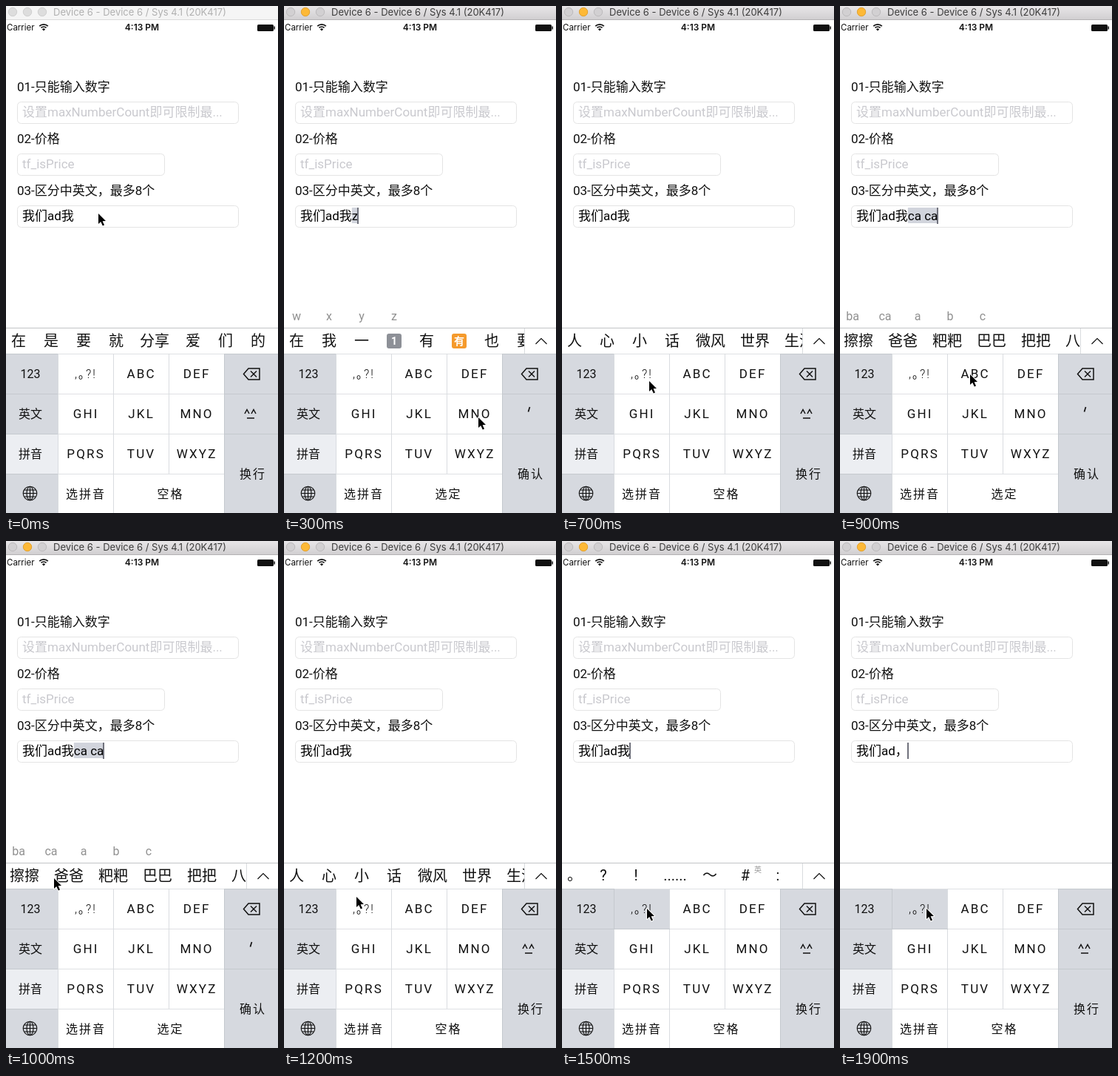
These frames come from a looping animation (368x684 px, 2000 ms). An HTML page with a canvas:

```html
<!DOCTYPE html>
<html lang="zh-CN">
<head>
<meta charset="utf-8">
<title>Text field limits</title>
<style>
  html, body { margin: 0; width: 100%; height: 100%; overflow: hidden; background: #fff; }
  canvas { display: block; width: 368px; height: 684px; }
</style>
</head>
<body>
<canvas id="stage" width="368" height="684"></canvas>
<script>
const ctx = document.getElementById('stage').getContext('2d');
const FONT = "Roboto, 'Noto Sans CJK SC', 'Noto Sans CJK', sans-serif";
const UI_FONT = 'Inter, sans-serif';
const LOOP = 2000, STEP = 100;
const KEY_GRAY = '#d6d9df', EDGE_GRAY = '#c5c9ce';

const BARS = {
  start: ['在', '是', '要', '就', '分享', '爱', '们', '的'],
  letterZ: ['在', '我', '一', '1', '有', '有', '也', '要'],
  follow: ['人', '心', '小', '话', '微风', '世界', '生活'],
  doubled: ['擦擦', '爸爸', '粑粑', '巴巴', '把把', '八八'],
  none: []
};
const EMOJI_SLOTS = { 3: '#8d9097', 5: '#f59a2c' };
const MARKS = [['。', 17], ['?', 56], ['!', 100], ['......', 153], ['～', 200], ['#', 248], [':', 292]];
const FULL = '我们ad我';

// Each state holds until the next one begins.
const STATES = [
  { at: 0, text: FULL, bar: 'start' },
  { at: 200, text: FULL, bar: 'letterZ', marked: 'z', hints: ['w', 'x', 'y', 'z'] },
  { at: 500, text: FULL, bar: 'follow' },
  { at: 900, text: FULL, bar: 'doubled', marked: 'ca ca', hints: ['ba', 'ca', 'a', 'b', 'c'] },
  { at: 1100, text: FULL, bar: 'follow' },
  { at: 1300, text: FULL, bar: 'marks', caret: true, pressed: true },
  { at: 1600, text: FULL, bar: 'marks', caret: true },
  { at: 1700, text: '我们ad', bar: 'none', caret: true },
  { at: 1800, text: '我们ad', bar: 'marks', marked: '，', pressed: true },
  { at: 1900, text: '我们ad，', bar: 'none', caret: true, pressed: true }
];

// Pointer tip at every step.
const POINTER = [
  [125, 280], [195, 445], [260, 600], [263, 555], [130, 470],
  [62, 453], [90, 480], [118, 506], [178, 497], [176, 497],
  [65, 455], [75, 455], [98, 480], [115, 496], [115, 496],
  [115, 496], [230, 493], [328, 492], [117, 496], [117, 496]
];

function rect(x, y, w, h, color) {
  ctx.fillStyle = color;
  ctx.fillRect(x, y, w, h);
}

function text(str, x, y, size, { color = '#111', align = 'left', spacing = 0, weight = 400, font = FONT } = {}) {
  ctx.font = `${weight} ${size}px ${font}`;
  ctx.letterSpacing = spacing + 'px';
  ctx.textAlign = align;
  ctx.fillStyle = color;
  ctx.fillText(str, x + (align === 'center' ? spacing / 2 : 0), y);
  return ctx.measureText(str).width;
}

function line(points, width = 1, color = '#111', close = false) {
  ctx.beginPath();
  points.forEach(([x, y]) => ctx.lineTo(x, y));
  if (close) ctx.closePath();
  ctx.lineWidth = width;
  ctx.strokeStyle = color;
  ctx.stroke();
}

function disc(x, y, r, fill, stroke) {
  ctx.beginPath();
  ctx.arc(x, y, r, 0, Math.PI * 2);
  ctx.fillStyle = fill;
  ctx.fill();
  ctx.lineWidth = 1;
  ctx.strokeStyle = stroke;
  ctx.stroke();
}

function roundBox(x, y, w, h, r) {
  ctx.beginPath();
  ctx.roundRect(x, y, w, h, r);
}

function drawTitleBar(active) {
  const shade = ctx.createLinearGradient(0, 0, 0, 18);
  shade.addColorStop(0, active ? '#e8e6e8' : '#f5f5f5');
  shade.addColorStop(1, active ? '#d1cfd1' : '#f5f5f5');
  rect(0, 0, 368, 18, shade);
  rect(0, 18, 368, 1, active ? '#b4b2b4' : '#dadada');
  for (const x of [9, 29, 49]) {
    if (active && x === 29) disc(x, 8, 5.7, '#fdb937', '#e2a12f');
    else disc(x, 8, 5.7, active ? '#d2d0d2' : '#dddddd', active ? '#bcbabc' : '#cfcfcf');
  }
  text('Device 6 - Device 6 / Sys 4.1 (20K417)', 64, 13, 13, { font: UI_FONT, color: active ? '#3c3c3c' : '#b0b0b0' });
}

function drawStatusBar() {
  text('Carrier', 1, 33, 11.5, { font: UI_FONT });
  text('4:13 PM', 184, 33, 12, { font: UI_FONT, weight: 600, align: 'center' });
  ctx.strokeStyle = ctx.fillStyle = '#111';
  ctx.lineWidth = 1.7;
  for (const r of [5, 8.2]) {
    ctx.beginPath();
    ctx.arc(51, 33, r, -Math.PI * 0.75, -Math.PI * 0.25);
    ctx.stroke();
  }
  ctx.beginPath();
  ctx.moveTo(51, 33.5);
  ctx.arc(51, 33.5, 3, -Math.PI * 0.75, -Math.PI * 0.25);
  ctx.fill();
  roundBox(340, 25, 22, 9, 1.5);
  ctx.fill();
  rect(362.5, 27.5, 1.5, 4, '#111');
}

function drawField(label, y, width, placeholder = '') {
  text(label, 15, y + 115, 17);
  roundBox(15.5, y + 129.5, width, 29, 5);
  ctx.lineWidth = 1;
  ctx.strokeStyle = '#e4e4e4';
  ctx.stroke();
  text(placeholder, 22, y + 149, 17, { color: '#c9c9ce' });
}

function drawInput({ text: typed, marked, caret }) {
  let end = 22 + text(typed, 22, 289, 17, { color: '#000' });
  if (marked) {
    const width = ctx.measureText(marked).width;
    rect(end, 272, width, 21, '#d1d4dc');
    text(marked, end, 289, 17, { color: '#000' });
    end += width;
  }
  if (marked || caret) rect(Math.round(end) - 1, 272, 2, 22, '#70727c');
}

function drawCandidates({ bar, hints = [] }) {
  hints.forEach((hint, i) => text(hint, 17 + 44 * i, 424, 16, { color: '#909090', align: 'center' }));
  rect(0, 434, 368, 1, '#c2c4c7');
  if (bar === 'none') return;

  const expandable = bar !== 'start';
  ctx.save();
  ctx.beginPath();
  ctx.rect(0, 435, expandable ? 325 : 368, 34);
  ctx.clip();
  if (bar === 'marks') {
    for (const [mark, x] of MARKS) text(mark, x, 458, 20, { align: 'center' });
    text('英', 265, 447, 10, { color: '#999', align: 'center' });
  } else {
    let left = -5;
    BARS[bar].forEach((word, i) => {
      const width = Math.max(44, 20 + 20 * word.length);
      const x = left + width / 2;
      const tile = bar === 'letterZ' && EMOJI_SLOTS[i];
      if (tile) {
        roundBox(x - 10, 442, 20, 20, 3);
        ctx.fillStyle = tile;
        ctx.fill();
        text(word, x, 457, 14, { color: '#fff', align: 'center', weight: 700 });
      } else {
        text(word, x, 459, 20, { align: 'center' });
      }
      left += width;
    });
  }
  ctx.restore();
  if (expandable) {
    rect(325, 435, 1, 34, '#d9dbde');
    line([[340.5, 456], [348, 448.5], [355.5, 456]], 1.2);
  }
}

function drawGlobe(x, y) {
  ctx.strokeStyle = '#111';
  ctx.lineWidth = 1.1;
  for (const rx of [9.3, 4.5]) {
    ctx.beginPath();
    ctx.ellipse(x, y, rx, 9.3, 0, 0, Math.PI * 2);
    ctx.stroke();
  }
  line([[x, y - 9], [x, y + 9]], 1.1);
  for (const [dy, half] of [[-4.5, 8], [0, 9], [4.5, 8]]) line([[x - half, y + dy], [x + half, y + dy]], 1.1);
}

function drawKeyboard({ marked, pressed }) {
  const rows = [469, 523, 577, 631];
  rect(0, 469, 368, 215, '#fff');
  rect(0, 469, 70, 215, KEY_GRAY);
  rect(0, 577, 70, 54, '#eceef2');
  rect(295, 469, 73, 215, KEY_GRAY);
  if (pressed) rect(70, 469, 75, 54, KEY_GRAY);

  for (const y of rows) {
    rect(0, y, 70, 1, EDGE_GRAY);
    rect(70, y, 225, 1, '#dfe1e4');
    if (y < 631) rect(295, y, 73, 1, EDGE_GRAY);
  }
  for (const x of [70, 145, 220]) rect(x, 469, 1, x === 220 ? 162 : 215, '#d9dce0');
  rect(295, 469, 1, 215, EDGE_GRAY);
  if (pressed) {
    rect(70, 523, 76, 1, EDGE_GRAY);
    rect(70, 469, 1, 54, EDGE_GRAY);
  }

  const side = { align: 'center' }, wide = { align: 'center', spacing: 2 };
  const letters = [['', 'ABC', 'DEF'], ['GHI', 'JKL', 'MNO'], ['PQRS', 'TUV', 'WXYZ']];
  letters.forEach((row, r) => row.forEach((label, c) =>
    text(label, 107 + 75 * c, 502 + 54 * r, 17, { align: 'center', spacing: 2.2 })));
  text(',｡?!', 107, 502, 16, { ...wide, weight: 300 });

  text('123', 33, 502, 16, side);
  text('英文', 33, 556, 16, side);
  text('拼音', 33, 610, 16, side);
  text('选拼音', 107, 664, 16, wide);
  text(marked ? '选定' : '空格', 221.5, 664, 16, wide);
  text(marked ? '确认' : '换行', 333, 637, 16, wide);
  drawGlobe(32.5, 657.5);

  line([[321.5, 496.5], [328, 489], [343, 489], [343, 504], [328, 504]], 1.5, '#111', true);
  line([[331, 492.5], [339, 500.5]], 1.5);
  line([[339, 492.5], [331, 500.5]], 1.5);
  if (marked) {
    line([[332.5, 541], [330.5, 547.5]], 1.7);
  } else {
    for (const x of [326, 335]) line([[x - 3, 550], [x, 544.5], [x + 3, 550]], 1.5);
    line([[326, 556], [336, 556]], 1.5);
  }
}

function drawPointer([x, y]) {
  ctx.save();
  ctx.translate(x, y);
  ctx.lineJoin = 'round';
  const arrow = [[0, 0], [0, 14], [3.2, 11], [5.8, 16.5], [8, 15.5], [5.6, 10.2], [10, 10]];
  line(arrow, 2, '#fff', true);
  ctx.fillStyle = '#000';
  ctx.fill();
  ctx.restore();
}

function draw(time) {
  const step = Math.floor((time % LOOP) / STEP);
  const state = STATES.findLast(({ at }) => at <= step * STEP);
  rect(0, 0, 368, 684, '#fff');
  drawTitleBar(step > 0);
  drawStatusBar();
  drawField('01-只能输入数字', 0, 299, '设置maxNumberCount即可限制最...');
  drawField('02-价格', 70, 199, 'tf_isPrice');
  drawField('03-区分中英文，最多8个', 140, 299);
  drawInput(state);
  drawCandidates(state);
  drawKeyboard(state);
  drawPointer(POINTER[step]);
}

const begin = performance.now();
function tick() {
  draw(performance.now() - begin);
  requestAnimationFrame(tick);
}
tick();
</script>
</body>
</html>
```
